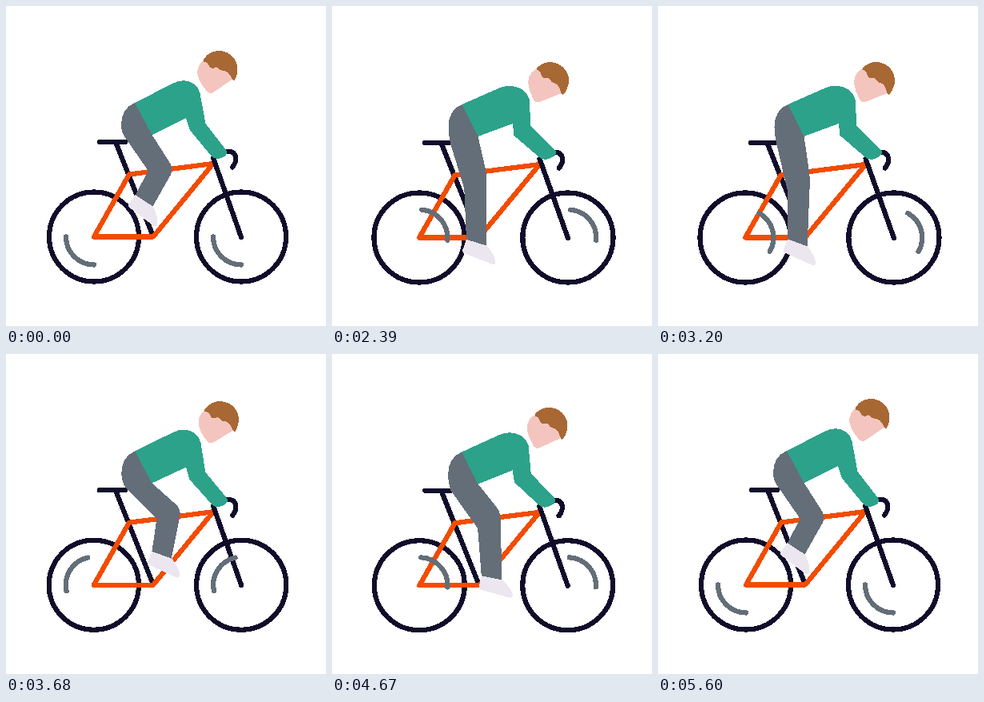
An HTML page that plays this animation: 400 px wide and 400 px high, repeating every 5660 ms.

```html
<!DOCTYPE html>
<html lang="en">
<head>
<meta charset="utf-8">
<title>Cyclist</title>
<style>
  html, body { margin: 0; width: 100%; height: 100%; overflow: hidden; background: #fff; }
  svg { display: block; width: 100vw; height: 100vh; shape-rendering: crispEdges; }
  .line { fill: none; stroke-width: 6.2; stroke-linecap: round; stroke-linejoin: round; }
  .navy { stroke: #100c2a; }
  .orange { stroke: #f24c00; }
  .gray { stroke: #646e78; }
</style>
</head>
<body>
<svg viewBox="0 0 400 400">
  <g id="bike">
    <g class="line navy">
      <circle cx="110" cy="288.5" r="56"/>
      <circle cx="294" cy="288.5" r="56"/>
      <path d="M117 170H149M137 170L184 288"/>
      <path d="M274 182H279C288 182 290 193 283 201.500"/>
    </g>
    <path class="line orange" d="M110 288.500L154 210.500L259 197L184 288.500Z"/>
    <path class="line navy" d="M259 190L294 289"/>
    <path class="line gray spin" data-x="110" d="M-35 0A35 35 0 0 0 0 35"/>
    <path class="line gray spin" data-x="294" d="M-35 0A35 35 0 0 0 0 35"/>
  </g>
  <path id="foot" fill="#ebe6ef" d="M-13-1L-13.600 14Q-13.600 16.500 -11.600 17L26 20Q30 20.500 30 17Q29 12 23 7L13-1Z"/>
  <path id="torso" fill="#2ca28b"/>
  <path id="leg" fill="#646e78"/>
  <g id="head">
    <path fill="#f4c5be" d="M250 66C242 70 238 78 239.500 86C241 94 246 100 251 106.500Q254.500 110.500 259 108L284 91L276 72Z"/>
    <path fill="#a86834" d="M246.500 67C252 59 259 56 266 56C279 56 289.500 66 289.500 79Q289 88 285.500 93Q283.500 93 281.500 89Q278 82 273 81Q268 81 266 78Q263 75 260 77.500Q256 79 253.500 74Q251 69.500 246.500 69.500Z"/>
  </g>
</svg>
<script>
const LOOP = 5660, HOLD = 2000, STEP = 30, STEPS = 120, CYCLE = 26;
const $ = id => document.getElementById(id);
const spokes = [...document.querySelectorAll('.spin')];
const rad = d => d * Math.PI / 180;
const fmt = p => p[0].toFixed(2) + ' ' + p[1].toFixed(2);

// constant speed up to step `at`, then slows down to reach `total` at the end
function coast(n, speed, at, total, power) {
  if (n <= at) return n * speed;
  return total - (total - at * speed) * Math.pow((STEPS - n) / (STEPS - at), power);
}

// swing through the pedal cycle, highest at phase `peak`
const swing = (p, peak) => Math.cos((p - peak) / CYCLE * 2 * Math.PI);

function toward(a, b, dist) {
  const dx = b[0] - a[0], dy = b[1] - a[1], k = dist / Math.hypot(dx, dy);
  return [a[0] + dx * k, a[1] + dy * k];
}

function drawLeg(p, bob) {
  const turn = rad(261 + p * 360 / CYCLE);
  const ankle = [176.5 + 25 * Math.cos(turn), 269.5 + 26.5 * Math.sin(turn)];
  const tilt = 25 + 14 * swing(p, -4);
  const ux = 13 * Math.cos(rad(tilt)), uy = 13 * Math.sin(rad(tilt));
  const heelCuff = [ankle[0] - ux, ankle[1] - uy];
  const toeCuff = [ankle[0] + ux, ankle[1] + uy];
  const knee = [201.7 + 17.5 * swing(p, 4.5), 207.5 - 14.5 * swing(p, 5.5)];
  const bend = [171.5 + 17.5 * swing(p, 5), 217 - 12.5 * swing(p, 2)];
  const at = (x, y, dx, dy) => fmt([x + dx * bob, y + dy * bob]);
  const groin = [182.5, 161 + 2 * bob];

  $('leg').setAttribute('d',
    `M${at(161, 121, 1.5, 2)}C${at(149, 125, 1.5, 2)} ${at(144, 137, 1.5, 2)} ${at(144, 148, 1.5, 3)}` +
    `C${at(144, 156, 1.5, 4)} ${at(146, 161, 1, 5)} ${at(150, 166, -2, 6)}` +
    `L${fmt(bend)}L${fmt(heelCuff)}L${fmt(toeCuff)}L${fmt(toward(knee, toeCuff, 9))}` +
    `Q${fmt(knee)} ${fmt(toward(knee, groin, 9))}L${fmt(groin)}Z`);
  $('foot').setAttribute('transform', `translate(${fmt(ankle)}) rotate(${tilt.toFixed(2)})`);
}

function drawTorso(bob) {
  const at = (x, y, dx, dy) => fmt([x + dx * bob, y + dy * bob]);
  // the back edge tucks under the trousers
  $('torso').setAttribute('d',
    `M${at(161, 121, 1.5, 2)}L${at(208, 97, 0, 6)}` +
    `C${at(222, 89, 1, 7)} ${at(239, 94, 3, 7)} ${at(242.5, 109, 4, 7)}` +
    `L${at(249.5, 147, -1, 3)}L${at(275, 180, 4, 0)}` +
    `Q${at(278, 184, 4, 0)} ${at(273, 188, 4, 0)}` +
    `Q${at(263, 194, 3, 1)} ${at(257, 188, 2, 1)}` +
    `L${at(230.5, 156, -3, 6)}Q${at(229, 154, -2, 6)} ${at(225, 140, 1, 7)}` +
    `L${at(182.5, 161, 0, 2)}L${at(168, 145, 0, 2)}Z`);
}

function draw(t) {
  const n = Math.max(0, Math.min(STEPS, Math.floor((t - HOLD) / STEP)));
  const p = coast(n, 1, 78, 4 * CYCLE, 1.36);
  const wheel = coast(n, 14.24, 85, 1440, 2.17);
  const bob = (1 - swing(p, 0)) / 2;

  for (const s of spokes)
    s.setAttribute('transform', `translate(${s.dataset.x} 288.5) rotate(${wheel.toFixed(2)})`);
  $('bike').setAttribute('transform',
    `translate(202 ${bob.toFixed(3)}) scale(${(1 + 0.01 * bob).toFixed(5)} 1) translate(-202 0)`);
  drawLeg(p, bob);
  drawTorso(bob);
  $('head').setAttribute('transform',
    `translate(${fmt([6 * bob, 13.7 * bob])}) rotate(${(12.5 * bob).toFixed(2)} 264 82)`);
}

const start = performance.now();
function tick() {
  draw((performance.now() - start) % LOOP);
  requestAnimationFrame(tick);
}
tick();
</script>
</body>
</html>
```
